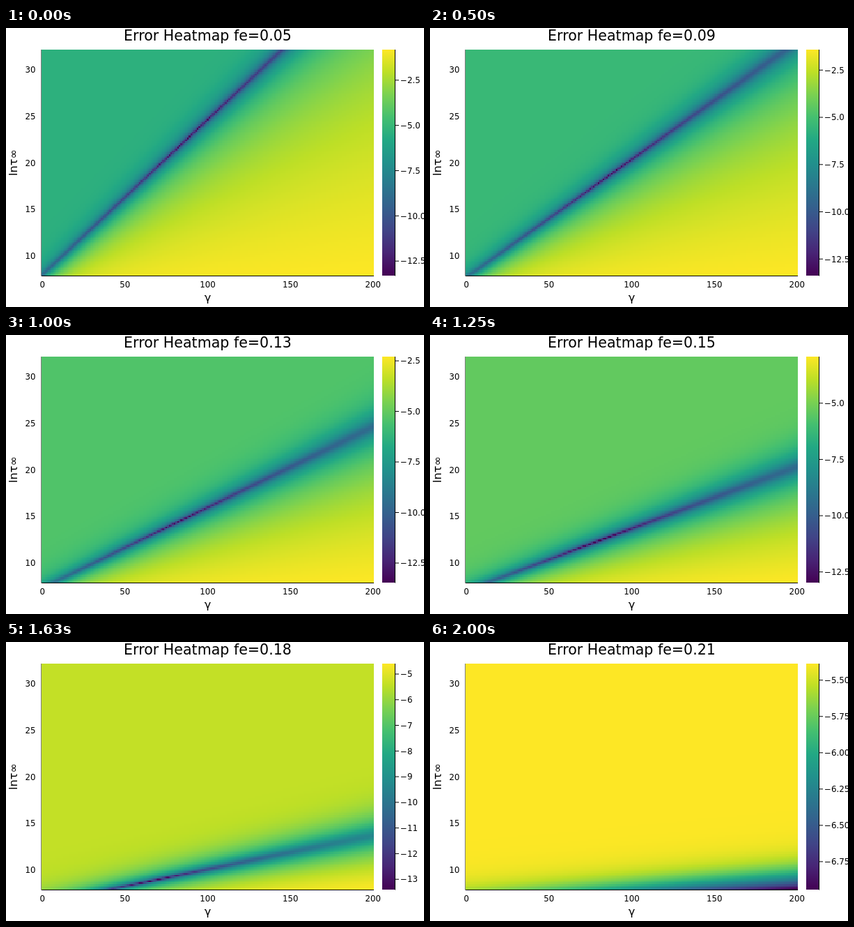
These frames come from a looping animation (600x400 px, 2120 ms). An HTML page with a canvas:

```html
<!DOCTYPE html>
<html lang="en">
<head>
<meta charset="utf-8">
<title>Error Heatmap</title>
<style>
html, body { margin: 0; width: 100%; height: 100%; overflow: hidden; background: #fff; }
canvas { display: block; }
</style>
</head>
<body>
<canvas id="stage" width="600" height="400"></canvas>
<script>
const LOOP = 2120, FRAMES = 17;
const COLS = 201, ROWS = 121;
const LEFT = 51, RIGHT = 528, TOP = 31, BOTTOM = 355;
const BAR_LEFT = 540, BAR_RIGHT = 558;
const TICK_SIZE = 11.8, GUIDE_SIZE = 16.2, TITLE_SIZE = 20.6;
const ctx = document.getElementById('stage').getContext('2d');

const viridis = ['440154', '482475', '414487', '355f8d', '2a788e', '21918c',
  '22a884', '44bf70', '7ad151', 'bddf26', 'fde725']
  .map(hex => [0, 2, 4].map(i => parseInt(hex.slice(i, i + 2), 16)));

function colorAt(u) {
  const p = Math.min(Math.max(u, 0), 1) * (viridis.length - 1);
  const i = Math.min(Math.floor(p), viridis.length - 2);
  return viridis[i].map((c, k) => c + (viridis[i + 1][k] - c) * (p - i));
}

// Measured relaxation: f falls from F0 logarithmically in time.
const F0 = 0.2267, T_END = 455, SAMPLES = 19, NOISE = 1.4e-6;
const samples = Array.from({ length: SAMPLES }, (_, k) => {
  const u = (k + 1) / SAMPLES;
  return { t: T_END * u, drop: Math.log(1 + 6.6 * u) / 95 };
});

// Inverse of ln E1(z) on an even grid of q, from dz/dq = -z exp(z + q).
const Q0 = -40 - Math.log(40.976), DQ = 0.002;
const zTable = new Float64Array(22800);
for (let i = 0, z = 40; i < zTable.length; i++) {
  zTable[i] = z;
  const q = Q0 + i * DQ;
  const mid = z - DQ / 2 * z * Math.exp(z + q);
  z -= DQ * mid * Math.exp(mid + q + DQ / 2);
}

function expInt(z) {
  let lo = 0, hi = zTable.length - 1;
  while (hi - lo > 1) {
    const mid = (lo + hi) >> 1;
    if (zTable[mid] > z) lo = mid; else hi = mid;
  }
  const part = (zTable[lo] - z) / (zTable[lo] - zTable[hi]);
  return Math.exp(Q0 + (lo + part) * DQ);
}

function inverseExpInt(e) {
  const p = (Math.log(e) - Q0) / DQ, i = Math.floor(p);
  return zTable[i] + (zTable[i + 1] - zTable[i]) * (p - i);
}

// Log squared error of dx/dt = -x exp(gamma x) / tau, with x = f - fe.
function errorField(fe) {
  const field = new Float64Array(COLS * ROWS), x0 = F0 - fe;
  for (let gamma = 0; gamma < COLS; gamma++) {
    const e0 = gamma ? expInt(gamma * x0) : 0;
    for (let row = 0; row < ROWS; row++) {
      const rate = Math.exp(0.2 * row - 32);
      let sum = NOISE;
      for (const { t, drop } of samples) {
        const x = gamma ? inverseExpInt(e0 + t * rate) / gamma : x0 * Math.exp(-t * rate);
        sum += (x0 - x - drop) ** 2;
      }
      field[row * COLS + gamma] = Math.log(sum);
    }
  }
  return field;
}

const maps = [];
function heatmap(index) {
  if (maps[index]) return maps[index];
  const fe = 0.05 + 0.01 * index, field = errorField(fe);
  let min = Infinity, max = -Infinity;
  for (const v of field) { min = Math.min(min, v); max = Math.max(max, v); }
  const canvas = document.createElement('canvas');
  canvas.width = COLS;
  canvas.height = ROWS;
  const c = canvas.getContext('2d'), image = c.createImageData(COLS, ROWS);
  field.forEach((v, i) => image.data.set([...colorAt((v - min) / (max - min)), 255], i * 4));
  c.putImageData(image, 0, 0);
  return maps[index] = { canvas, fe, min, max };
}

function text(string, x, y, size, align) {
  ctx.font = `${size}px "DejaVu Sans", sans-serif`;
  ctx.textAlign = align;
  ctx.fillText(string, x, y);
}

function line(x1, y1, x2, y2) {
  ctx.beginPath();
  ctx.moveTo(x1, y1);
  ctx.lineTo(x2, y2);
  ctx.stroke();
}

function drawColorbar({ min, max }) {
  const gradient = ctx.createLinearGradient(0, BOTTOM, 0, TOP);
  viridis.forEach((c, i) => gradient.addColorStop(i / (viridis.length - 1), `rgb(${c})`));
  ctx.fillStyle = gradient;
  ctx.fillRect(BAR_LEFT, TOP, BAR_RIGHT - BAR_LEFT, BOTTOM - TOP);
  ctx.fillStyle = '#000';
  line(BAR_RIGHT + 0.5, TOP, BAR_RIGHT + 0.5, BOTTOM + 0.5);

  const span = max - min;
  const [step, digits] = span > 9.45 ? [2.5, 1] : span > 2 ? [1, 0] : [0.25, 2];
  for (let n = Math.ceil(min / step - 0.02); n * step <= max; n++) {
    const y = Math.min(TOP + (max - n * step) / span * (BOTTOM - TOP), BOTTOM);
    line(BAR_RIGHT, y, BAR_RIGHT + 6, y);
    text('\u2212' + Math.abs(n * step).toFixed(digits), 566, y + 4.3, TICK_SIZE, 'left');
  }
}

function draw(index) {
  const map = heatmap(index);
  ctx.fillStyle = '#fff';
  ctx.fillRect(0, 0, 600, 400);
  ctx.fillStyle = ctx.strokeStyle = '#000';
  ctx.lineWidth = 1;
  line(LEFT, TOP, LEFT, BOTTOM + 0.5);
  ctx.imageSmoothingEnabled = false;
  ctx.drawImage(map.canvas, LEFT, TOP, RIGHT - LEFT, BOTTOM - TOP);
  line(LEFT, BOTTOM + 0.5, RIGHT, BOTTOM + 0.5);

  text('Error Heatmap fe=' + map.fe.toFixed(2), 289.5, 18, TITLE_SIZE, 'center');
  for (let g = 0; g <= 200; g += 50) {
    text(g, LEFT + (g + 0.5) * (RIGHT - LEFT) / COLS, 371.8, TICK_SIZE, 'center');
  }
  for (let v = 10; v <= 30; v += 5) {
    text(v, 42.5, TOP + (32.1 - v) / 24.2 * (BOTTOM - TOP) + 4.5, TICK_SIZE, 'right');
  }
  text('γ', 289.5, 392, GUIDE_SIZE, 'center');
  ctx.save();
  ctx.translate(16.3, 193);
  ctx.rotate(-Math.PI / 2);
  text('lnτ∞', 0, 0, GUIDE_SIZE, 'center');
  ctx.restore();
  drawColorbar(map);
}

let shown = -1;
function tick() {
  const t = performance.now() % LOOP;
  let index = FRAMES - 1;
  while (Math.round(12.5 * index) * 10 > t) index--;
  if (index !== shown) draw(shown = index);
  requestAnimationFrame(tick);
}
tick();
</script>
</body>
</html>
```
